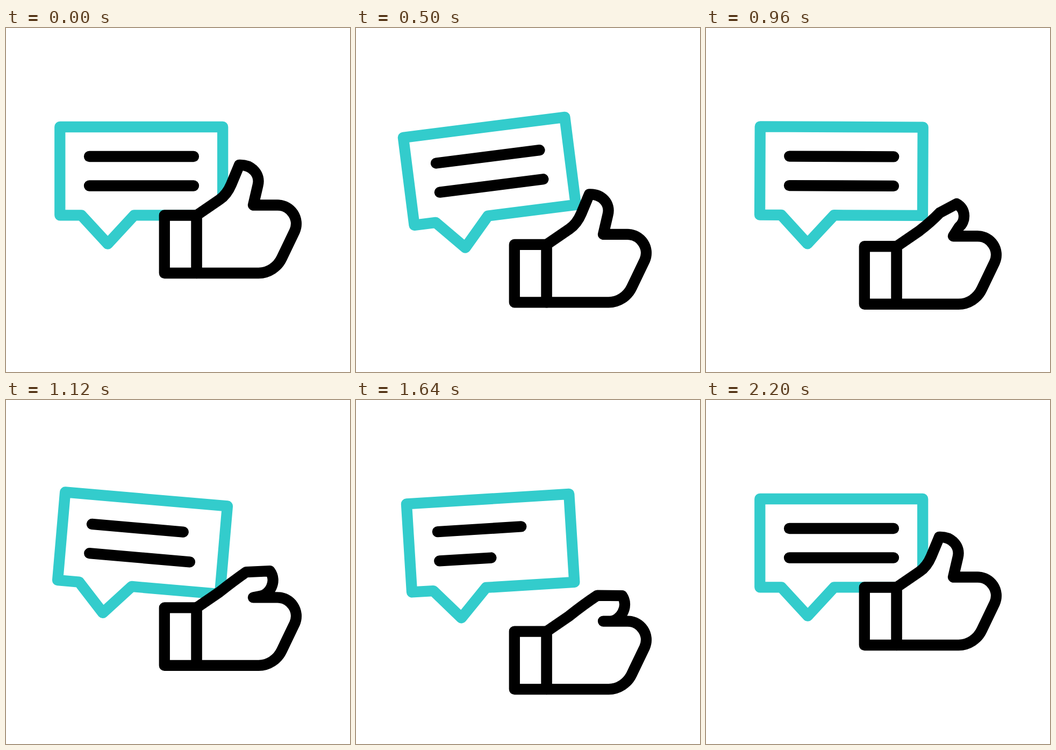
These frames come from a looping animation (640 by 640 pixels, 2400 ms). An HTML page:

```html
<!DOCTYPE html>
<html lang="en">
<head>
<meta charset="utf-8">
<title>Feedback</title>
<style>
html, body { margin: 0; width: 100%; height: 100%; overflow: hidden; background: #fff; }
svg { display: block; width: 100%; height: 100%; }
path { fill: none; stroke: #000; stroke-width: 20.3; stroke-linecap: round; stroke-linejoin: round; }
.teal { stroke: #33cccc; }
.solid { fill: #fff; }
</style>
</head>
<body>
<svg viewBox="0 0 640 640">
  <g id="bubble">
    <path class="teal" d="M100.3 184H403.2V348.3H238.5L189.3 401.7L140.2 348.3H100.3Z"/>
    <path id="line1"/>
    <path id="line2"/>
  </g>
  <g id="hand">
    <path class="solid" d="M294.8 348.5H354.7V456H294.8Z"/>
    <path class="solid" id="fist"/>
  </g>
  <path class="teal" id="spark1"/>
  <path class="teal" id="spark2"/>
</svg>
<script>
const LOOP = 2400, STEP = 20;
const el = id => document.getElementById(id);
const draw = (id, d) => el(id).setAttribute('d', d);
const place = (id, v) => el(id).setAttribute('transform', v);
const mix = (a, b, k) => a + (b - a) * k;

// Smooth rise from 0 to 1 between times a and b.
function ease(t, a, b) {
  const u = Math.min(1, Math.max(0, (t - a) / (b - a)));
  return u * u * (3 - 2 * u);
}

// Rise from a to b, then fall until c.
const pulse = (t, a, b, c) => ease(t, a, b) - ease(t, b, c);

// The thumb goes from raised (k = 0) to folded (k = 1).
function fist(k) {
  const p = (x, y, foldX, foldY) => `${mix(x, foldX, k)} ${mix(y, foldY, k)} `;
  const joint = p(419, 291, 449, 281.5);
  const tip = p(434, 255, 495, 282);
  const root = p(468.5, 293, 473, 329.5);
  return 'M354.7 456V348.5L397 319.5' +
    'Q' + p(411, 310, 424, 298) + joint + 'L' + tip +
    'C' + p(457, 254, 509, 303) + p(474, 272, 491, 329.5) + root +
    'L460 329.5H505C530 329.5 547 355 537 378L513 428C505 445 488 456 470 456Z';
}

// A stroke that grows from its start, then shrinks towards its end.
function spark(id, t, x, y, dx, dy) {
  const head = ease(t, 1800, 2040), tail = ease(t, 1960, 2200);
  const at = k => `${x + dx * k} ${y + dy * k}`;
  draw(id, head > tail ? `M${at(tail)}L${at(head)}` : '');
}

function frame(now) {
  const t = Math.floor(now % LOOP / STEP) * STEP;
  const tilt = 5 * pulse(t, 660, 1140, 1800) - 10 * pulse(t, 200, 660, 1140) - 5 * pulse(t, 1140, 1800, 2200);
  const drop = 84 * pulse(t, 200, 700, 1200) + 34.5 * pulse(t, 700, 1200, 1700) + 84 * pulse(t, 1200, 1700, 2200);
  place('bubble', `rotate(${tilt} 251.5 292.5)`);
  place('hand', `translate(0 ${drop})`);
  draw('line1', `M155 239h${194 - 109 * pulse(t, 1000, 1400, 1800)}`);
  draw('line2', `M155 293.5h${194 - 109 * pulse(t, 1000, 1800, 2200)}`);
  draw('fist', fist(ease(t, 700, 1200) - ease(t, 1700, 2200)));
  spark('spark1', t, 498.5, 290.5, 15.5, -45.5);
  spark('spark2', t, 522.5, 314.5, 46.5, -16.5);
}

const start = performance.now();
function tick() {
  frame(performance.now() - start);
  requestAnimationFrame(tick);
}
tick();
</script>
</body>
</html>
```
